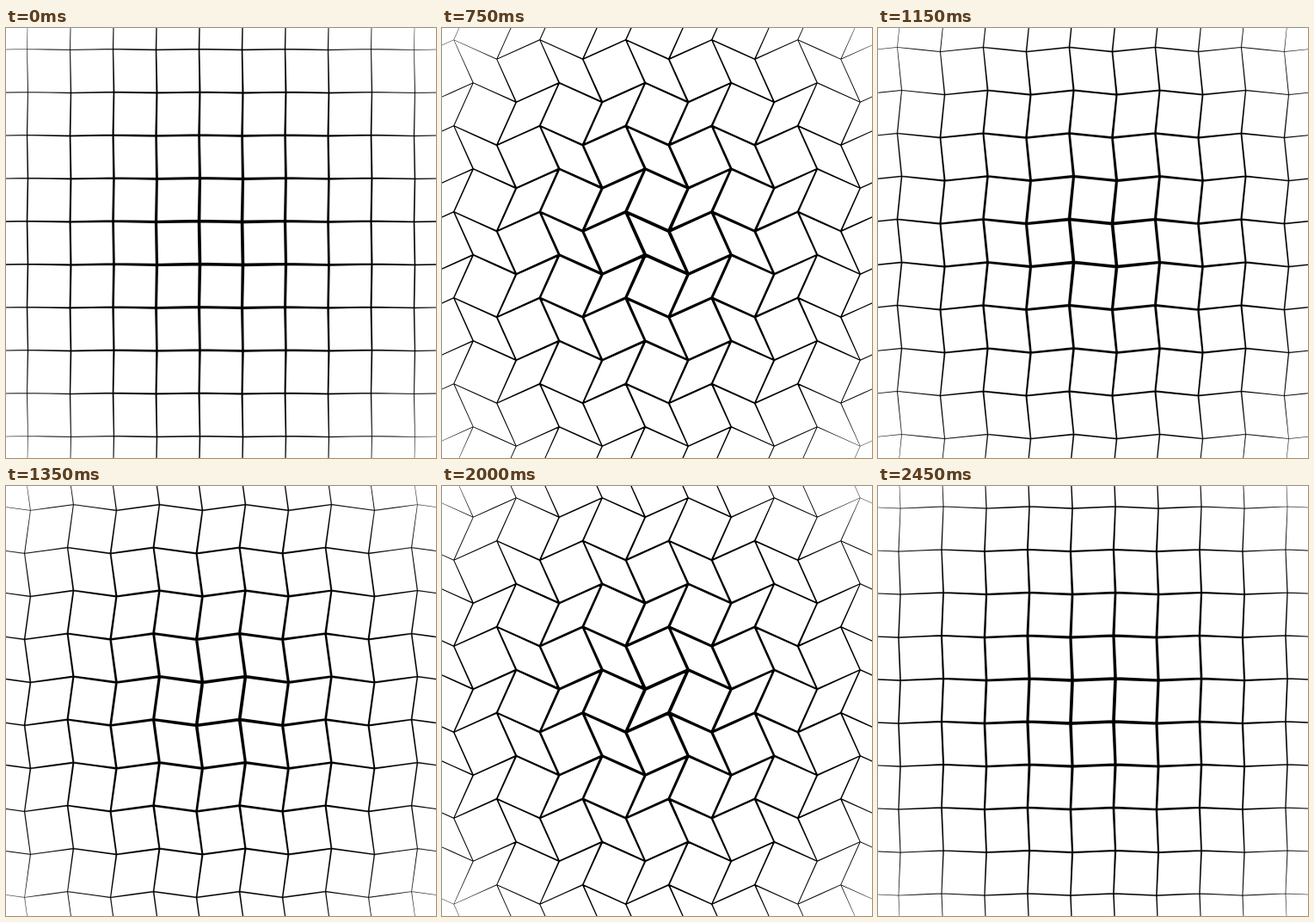
An HTML page with a canvas that plays this animation: 500x500 px, repeating every 2.5 s.

```html
<!DOCTYPE html>
<html lang="en">
<head>
<meta charset="utf-8">
<title>Swaying grid</title>
<style>
  html, body { margin: 0; width: 100%; height: 100%; overflow: hidden; background: #fff; }
  canvas { display: block; }
</style>
</head>
<body>
<canvas id="stage" width="500" height="500"></canvas>
<script>
const SIZE = 500, CELL = 50, COUNT = 12;
const STEP = 50, STEPS = 50, LEAD = 5;
const SWAY = 12, SHUTTER = 0.6, SAMPLES = 4;
const THICK = 4, THIN = 0.25;
const MID = SIZE / 2, REACH = MID * Math.SQRT2;

const ctx = document.getElementById('stage').getContext('2d');

const halfWidth = (x, y) =>
  Math.max(0.1, THICK + (THIN - THICK) * Math.hypot(x - MID, y - MID) / REACH) / 2;

// Rows slide sideways and columns slide up or down, alternating in direction.
function vertex(col, row, shift) {
  return [
    (col - 0.5) * CELL + (row % 2 ? -shift : shift),
    (row - 0.5) * CELL + (col % 2 ? -shift : shift)
  ];
}

function taper(path, [ax, ay], [bx, by]) {
  const len = Math.hypot(bx - ax, by - ay);
  const nx = (ay - by) / len, ny = (bx - ax) / len;
  const wa = halfWidth(ax, ay), wb = halfWidth(bx, by);
  path.moveTo(ax + nx * wa, ay + ny * wa);
  path.lineTo(bx + nx * wb, by + ny * wb);
  path.lineTo(bx - nx * wb, by - ny * wb);
  path.lineTo(ax - nx * wa, ay - ny * wa);
  path.closePath();
}

function edge(path, a, b) {
  const mid = [(a[0] + b[0]) / 2, (a[1] + b[1]) / 2];
  taper(path, a, mid);
  taper(path, mid, b);
}

function gridPath(shift) {
  const path = new Path2D();
  for (let row = 0; row < COUNT; row++) {
    for (let col = 0; col < COUNT; col++) {
      const p = vertex(col, row, shift);
      const r = halfWidth(...p);
      path.moveTo(p[0] + r, p[1]);
      path.arc(p[0], p[1], r, 0, Math.PI * 2, true);
      if (col < COUNT - 1) edge(path, p, vertex(col + 1, row, shift));
      if (row < COUNT - 1) edge(path, p, vertex(col, row + 1, shift));
    }
  }
  return path;
}

// Averages a few moments within the step for a slight motion blur.
function draw(step) {
  ctx.clearRect(0, 0, SIZE, SIZE);
  ctx.globalCompositeOperation = 'lighter';
  ctx.globalAlpha = 1 / SAMPLES;
  for (let k = 0; k < SAMPLES; k++) {
    const phase = (step + SHUTTER * (k + 0.5) / SAMPLES) / STEPS;
    ctx.fill(gridPath(SWAY * Math.sin(phase * Math.PI * 2)));
  }
}

let start, shown = -1;
function tick(now) {
  start ??= now;
  const step = Math.floor((now - start + LEAD) / STEP) % STEPS;
  if (step !== shown) draw(shown = step);
  requestAnimationFrame(tick);
}
requestAnimationFrame(tick);
</script>
</body>
</html>
```
